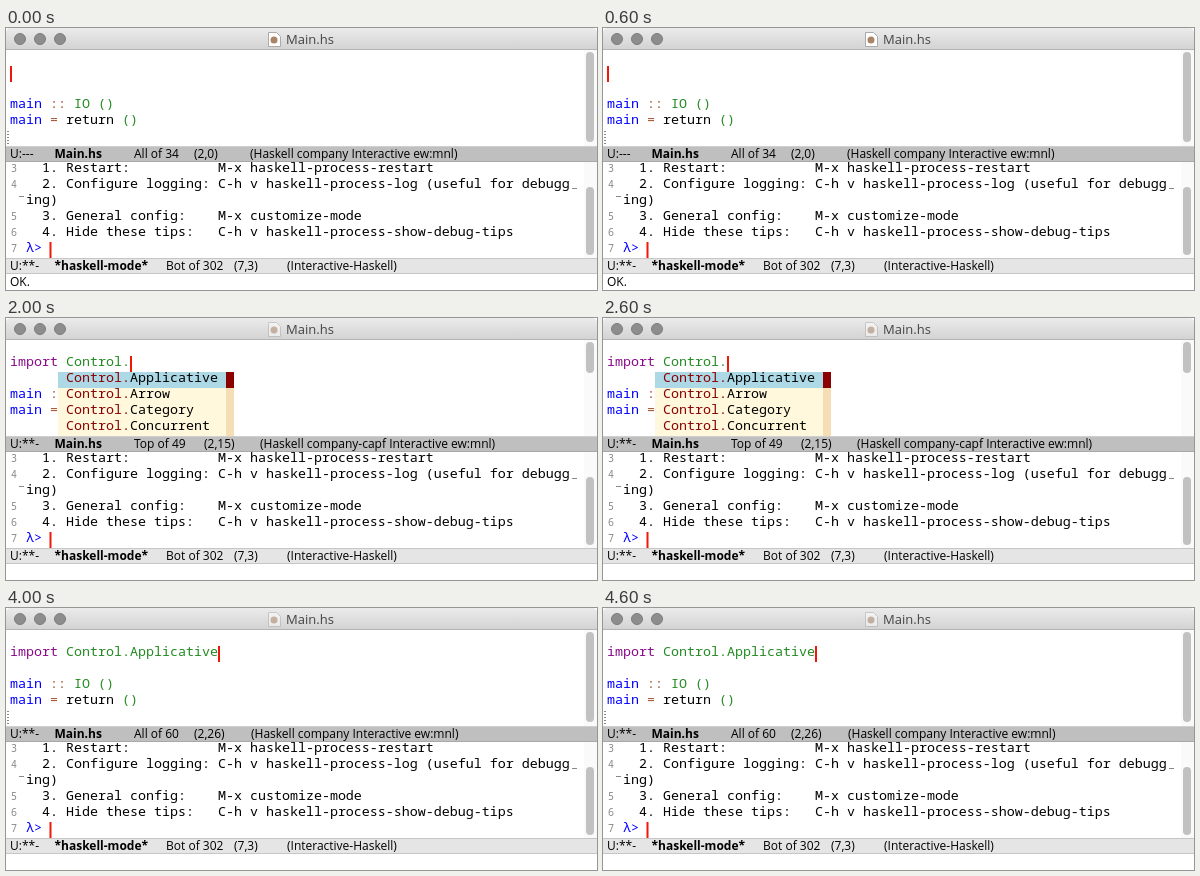
These frames come from a looping animation (591x262 px, 5000 ms). An HTML page:

```html
<!DOCTYPE html>
<html lang="en">
<head>
<meta charset="utf-8">
<title>Main.hs</title>
<style>
html, body { margin: 0; width: 100%; height: 100%; overflow: hidden; background: #fff; }
svg { display: block; }
text { white-space: pre; font: 12px "Open Sans", sans-serif; }
.code { font: 13.333px "Noto Sans Mono", monospace; }
.num { font: 10px "Noto Sans Mono", monospace; fill: #888; }
.bold { font-weight: bold; }
.title { font-size: 13px; fill: #444; }
</style>
</head>
<body>
<svg id="stage" width="591" height="262" viewBox="0 0 591 262"></svg>
<script>
const BLUE = '#00f', GREEN = '#228b22', SIENNA = '#a0522d', PURPLE = '#8a0a8a',
      DARKRED = '#8b0000', BLACK = '#000', RED = '#f01808';

const rect = (x, y, w, h, fill, extra = '') =>
  `<rect x="${x}" y="${y}" width="${w}" height="${h}" fill="${fill}" ${extra}/>`;
const text = (x, y, s, cls = '') => `<text x="${x}" y="${y}" class="${cls}">${s}</text>`;
// Coloured source line given as colour, string, colour, string...
const code = (x, y, ...parts) => {
  let s = '';
  for (let i = 0; i < parts.length; i += 2)
    s += `<tspan fill="${parts[i]}">${parts[i + 1].replace(/>/g, '&gt;')}</tspan>`;
  return text(x, y, s, 'code');
};
const cursor = (x, y) => rect(x, y, 2, 16, RED);
const thumb = (y, h) => rect(580, y, 8, h, '#c1c1c1', 'rx="4"');

function bar(y, fill, edge, flag, name, items) {
  return rect(0, y, 591, 16, fill) + rect(0, y, 591, 1, edge[0]) + rect(0, y + 15, 591, 1, edge[1]) +
    text(4, y + 12, flag) + text(48.5, y + 12, name, 'bold') +
    items.map(([x, s]) => text(x, y + 12, s)).join('');
}

const modules = ['Applicative', 'Arrow', 'Category', 'Concurrent'];
const states = [
  { typed: '', pos: 'All of 34', xs: [188, 244], echo: 'OK.' },
  { typed: 'import', pos: 'All of 40', xs: [188, 244] },
  { typed: 'import Control.', pos: 'Top of 49', xs: [198, 254], rows: 4, thumb: 31 },
  { typed: 'import Control.A', pos: 'Top of 50', xs: [198, 254], rows: 2, thumb: 33 },
  { typed: 'import Control.Applicative', pos: 'All of 60', xs: [188, 245] }
];

function titleBar(faded) {
  return `<defs><linearGradient id="g" x2="0" y2="1"><stop stop-color="#ebebeb"/>
    <stop offset="1" stop-color="#d2d2d2"/></linearGradient></defs>
    <path d="M0 22V5Q0 0 5 0H586Q591 0 591 5V22Z" fill="url(#g)"/>` +
    rect(0, 21, 591, 1, '#b4b4b4') +
    [14, 34, 54].map(x => `<circle cx="${x}" cy="11" r="5.5" fill="#8d8d8d" stroke="#7c7c7c"/>`).join('') +
    `<g opacity="${faded ? .5 : 1}"><path d="M262.5 4.5H270.5L274.5 8.5V18.5H262.5Z" fill="#fff" stroke="#aaa"/>
    <circle cx="268" cy="12" r="3.5" fill="#a98467"/></g>` +
    text(280, 16, 'Main.hs', 'title');
}

function popup(rows, prefix) {
  let s = '';
  for (let i = 0; i < rows; i++) {
    const y = 54 + 16 * i, name = 'Control.' + modules[i];
    s += rect(52, y, 168, 16, i ? '#fff8dc' : '#add8e6') +
      code(60, y + 10, DARKRED, prefix, BLACK, name.slice(prefix.length));
  }
  if (rows > 2) s += rect(220, 54, 8, 64, '#f5deb3') + rect(220, 54, 8, 16, DARKRED);
  return s;
}

function editor({ typed, pos, xs, rows = 0, thumb: size = 90 }) {
  const full = !rows, n = typed.length;
  let s = code(4, 48, PURPLE, typed.slice(0, 6), GREEN, typed.slice(6)) + cursor(4 + 8 * n, 38);
  s += code(4, 80, BLUE, 'main ', SIENNA, full ? '::' : ':', GREEN, full ? ' IO ()' : '');
  s += code(4, 96, BLUE, 'main ', SIENNA, '=', BLACK, rows < 4 ? ' return ' : '', GREEN, rows < 4 ? '()' : '');
  if (rows < 4) for (let y = 103; y < 118; y += 3) s += rect(1, y, 2, 1, '#888');
  s += popup(rows, typed.slice(7));
  s += rect(578, 22, 13, 96, '#fafafa') + thumb(24, size);
  return s + bar(118, '#bfbfbf', ['#cfcfcf', '#a8a8a8'], n ? 'U:**-' : 'U:---', 'Main.hs', [
    [128, pos], [xs[0], `(2,${n})`],
    [xs[1], `(Haskell company${rows ? '-capf' : ''} Interactive ew:mnl)`]
  ]);
}

function repl() {
  const lines = [
    [3, '  1. Restart:           M-x haskell-process-restart'],
    [4, '  2. Configure logging: C-h v haskell-process-log (useful for debugg'],
    ['', 'ing)'],
    [5, '  3. General config:    M-x customize-mode'],
    [6, '  4. Hide these tips:   C-h v haskell-process-show-debug-tips'],
    [7, '']
  ];
  return lines.map(([n, s], i) => text(5, 144 + 16 * i, n, 'num') + code(20, 144 + 16 * i, BLACK, s)).join('') +
    rect(566, 160, 5, 1, '#888') + rect(13, 168, 5, 1, '#888') +
    code(20, 224, BLUE, 'λ>') + cursor(43.5, 214) +
    rect(578, 134, 13, 96, '#fafafa') + thumb(159, 68) +
    bar(230, '#e5e5e5', ['#c6c6c6', '#c6c6c6'], 'U:**-', '*haskell-mode*', [
      [160, 'Bot of 302'], [228, '(7,3)'], [281, '(Interactive-Haskell)']
    ]);
}

const stage = document.getElementById('stage');
let shown = -1;
function tick() {
  const i = Math.floor(performance.now() / 1000) % states.length;
  if (i !== shown) {
    shown = i;
    const state = states[i];
    stage.innerHTML = titleBar(i > 1) + repl() + editor(state) + text(4, 258, state.echo || '');
  }
  requestAnimationFrame(tick);
}
tick();
</script>
</body>
</html>
```
